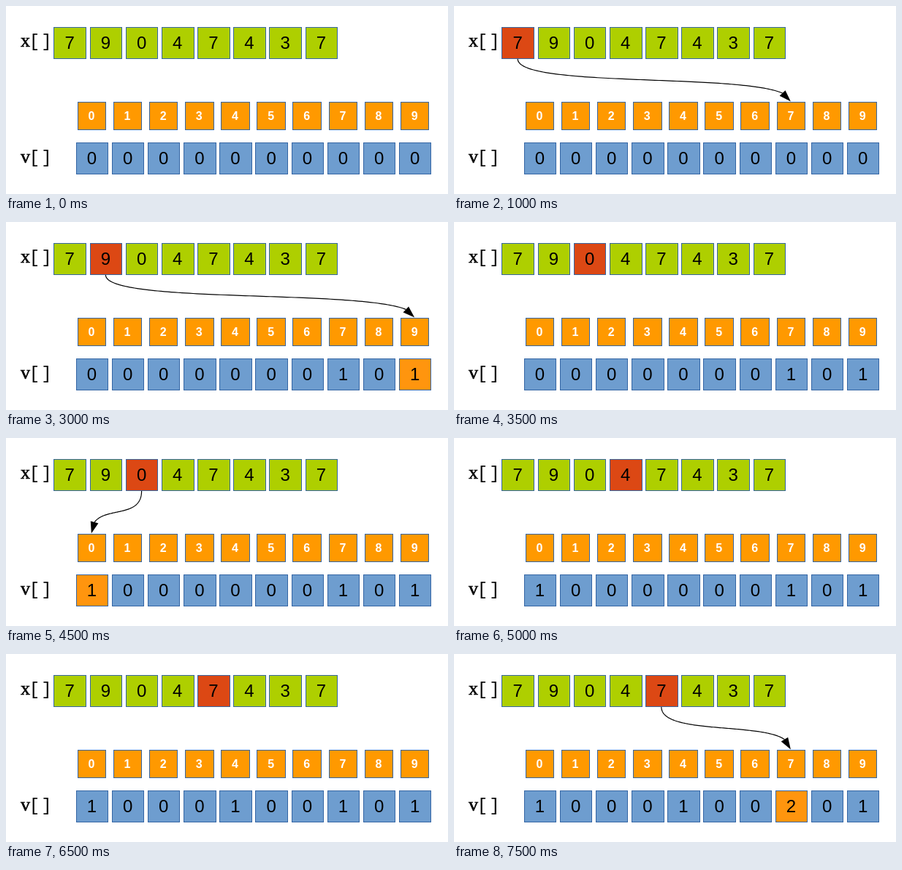
An HTML page with a canvas for the animation above (8 s loop, 605 by 259 pixels).

```html
<!DOCTYPE html>
<html>
<head>
<meta charset="utf-8">
<style>
  html, body { margin: 0; width: 605px; height: 259px; overflow: hidden; background: #fff; }
  canvas { display: block; }
</style>
</head>
<body>
<canvas id="stage" width="605" height="259"></canvas>
<script>
const ctx = document.getElementById('stage').getContext('2d');
const STEP = 500, STEPS = 16, PITCH = 49.15;
const input = [7, 9, 0, 4, 7, 4, 3, 7];
const SANS = '"Liberation Sans", Arial, sans-serif';
const DIGIT = '24px ' + SANS;
const INDEX = 'bold 16px ' + SANS;
const MONO = '24px "Liberation Mono", monospace';

const inputRow = { left: 65.47, top: 29, width: 43.6, height: 43, baseline: 59, font: DIGIT, color: '#000' };
const indexRow = { left: 97.55, top: 132, width: 38.55, height: 38, baseline: 157, font: INDEX, color: '#fff' };
const countRow = { left: 95.7, top: 188, width: 43.4, height: 43, baseline: 218, font: DIGIT, color: '#000' };

function text(str, x, y, font, color = '#000') {
  ctx.font = font;
  ctx.fillStyle = color;
  ctx.fillText(str, x, y);
}

// Edges snap to whole pixels, labels stay at the unrounded centre
function box(row, i, fill, label) {
  const left = row.left + i * PITCH;
  const x = Math.round(left), width = Math.round(left + row.width) - x;
  const rect = [x + 0.5, row.top + 0.5, width, row.height];
  ctx.fillStyle = fill;
  ctx.fillRect(...rect);
  ctx.strokeStyle = '#3465a4';
  ctx.lineWidth = 1;
  ctx.strokeRect(...rect);
  text(label, left + row.width / 2, row.baseline, row.font, row.color);
}

function rowLabel(letter, y) {
  const font = '26px "Liberation Serif", serif';
  text(letter, 26.5, y, font);
  ctx.strokeStyle = '#000';
  ctx.lineWidth = 0.6;
  ctx.strokeText(letter, 26.5, y);
  text('[', 39, y, MONO);
  text(']', 55.5, y, MONO);
}

// S-curve that leaves and arrives vertically, ending in a filled head
function arrow(from, to) {
  const x0 = inputRow.left + inputRow.width / 2 + from * PITCH, y0 = 73;
  const x1 = indexRow.left + indexRow.width / 2 + to * PITCH, y1 = 131.5;
  const dx = x1 - x0, dy = y1 - y0;
  const at = t => {
    const u = 1 - t, a = 3 * u * u * t, b = 3 * u * t * t, c = t * t * t;
    return [x0 + dx * (b + c), y0 + dy * (0.75 * a + 0.25 * b + c)];
  };
  let t = 1, x, y, dist;
  do {
    t -= 0.002;
    [x, y] = at(t);
    dist = Math.hypot(x1 - x, y1 - y);
  } while (dist < 16);

  ctx.strokeStyle = ctx.fillStyle = '#000';
  ctx.lineWidth = 1.2;
  ctx.beginPath();
  ctx.moveTo(x0, y0);
  for (let s = 0; s <= 100; s++) ctx.lineTo(...at(t * s / 100));
  ctx.stroke();

  const nx = (y1 - y) / dist * 5.5, ny = (x - x1) / dist * 5.5;
  ctx.beginPath();
  ctx.moveTo(x1, y1);
  ctx.lineTo(x + nx, y + ny);
  ctx.lineTo(x - nx, y - ny);
  ctx.fill();
}

function draw(step) {
  // Each element takes three steps: select, point, count
  const current = step ? Math.floor((step - 1) / 3) : -1;
  const phase = step ? (step - 1) % 3 : 0;
  const counts = Array(10).fill(0);
  const counted = current + (phase === 2 ? 1 : 0);
  for (let i = 0; i < counted; i++) counts[input[i]]++;

  ctx.fillStyle = '#fff';
  ctx.fillRect(0, 0, 605, 259);
  ctx.textAlign = 'center';
  rowLabel('x', 56);
  rowLabel('v', 216);

  input.forEach((n, i) => box(inputRow, i, i === current ? '#dc4814' : '#aecf00', n));
  counts.forEach((n, i) => {
    const active = phase === 2 && i === input[current];
    box(indexRow, i, '#ff9900', i);
    box(countRow, i, active ? '#ff950e' : '#6e9dcf', n);
  });
  if (phase) arrow(current, input[current]);
}

const start = performance.now();
function frame() {
  draw(Math.floor((performance.now() - start) / STEP) % STEPS);
  requestAnimationFrame(frame);
}
frame();
</script>
</body>
</html>
```
